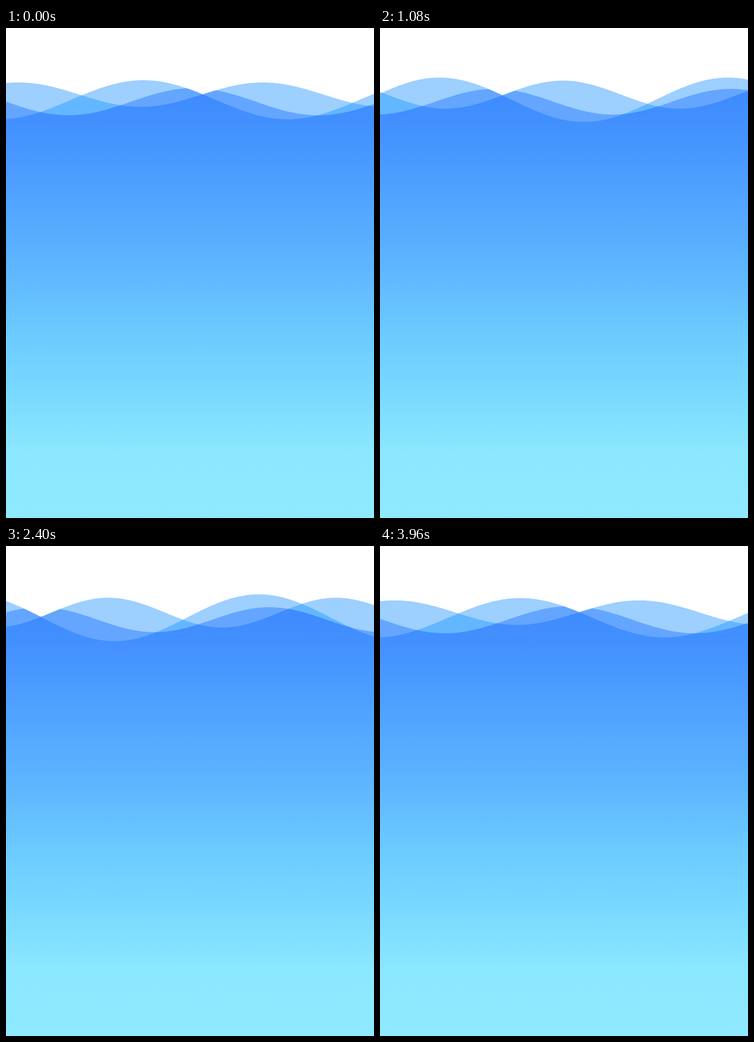
An HTML page with a canvas that plays this animation: 648 by 864 pixels, repeating every 4 s.

```html
<!DOCTYPE html>
<html lang="en">
<head>
<meta charset="utf-8">
<title>Waves</title>
<style>
  html, body { margin: 0; width: 100%; height: 100%; overflow: hidden; background: #fff; }
  canvas { display: block; width: 100vw; height: 100vh; }
</style>
</head>
<body>
<canvas id="sea" width="648" height="864"></canvas>
<script>
const W = 648, H = 864, LOOP = 4000, STEP = 40;
const ctx = document.getElementById('sea').getContext('2d');

// crest: position at the start, middle and end of the loop
// amp, length: value at the ends and in the middle of the loop
const waves = {
  tall:  { level: 126.5, amp: [34.5, 43],   length: [508, 508], crest: [242, -12, -266], drift: 0 },
  short: { level: 117.5, amp: [21.5, 27.5], length: [430, 398], crest: [452, 217, 22],   drift: 3.5 },
  deep:  { level: 130,   amp: [24, 21.5],   length: [440, 399], crest: [330, 100, -110], drift: 4.5 }
};

const LIGHT = '#9dcfff', MIX = '#62b7ff', SHADE = '#64a6ff';
const water = ctx.createLinearGradient(0, 110, 0, H);
[
  [110, 62, 138], [190, 68, 147], [300, 81, 164], [420, 94, 181], [540, 108, 203],
  [660, 124, 219], [750, 140, 232], [H, 143, 233]
].forEach(([y, r, g]) => water.addColorStop((y - 110) / (H - 110), `rgb(${r},${g},255)`));

const mix = (a, b, k) => a + (b - a) * k;

function wavePath({ level, amp, length, crest, drift }, t) {
  const u = t / (LOOP / 2);
  const swell = 1 - Math.abs(1 - u);
  const ease = (1 - Math.cos(Math.PI * u)) / 2;
  const a = mix(...amp, swell);
  const len = mix(...length, ease);
  const half = u < 1 ? 0 : 1;
  const peak = mix(crest[half], crest[half + 1], u - half) - drift * Math.sin(Math.PI * u);
  const path = new Path2D();
  path.moveTo(0, H);
  for (let x = 0; x <= W; x += 3) {
    path.lineTo(x, level - a * Math.cos(2 * Math.PI * (x - peak) / len));
  }
  path.lineTo(W, H);
  path.closePath();
  return path;
}

function fill(path, color, ...clips) {
  ctx.save();
  clips.forEach(c => ctx.clip(c));
  ctx.fillStyle = color;
  ctx.fill(path);
  ctx.restore();
}

function draw(t) {
  const tall = wavePath(waves.tall, t);
  const short = wavePath(waves.short, t);
  const deep = wavePath(waves.deep, t);
  ctx.fillStyle = '#fff';
  ctx.fillRect(0, 0, W, H);
  fill(tall, LIGHT);
  fill(short, LIGHT);
  fill(short, MIX, tall);
  fill(tall, SHADE, deep);
  fill(short, SHADE, deep);
  fill(short, water, tall, deep);
}

const start = performance.now();
function tick() {
  const t = (performance.now() - start) % LOOP;
  draw(Math.floor(t / STEP) * STEP);
  requestAnimationFrame(tick);
}
tick();
</script>
</body>
</html>
```
